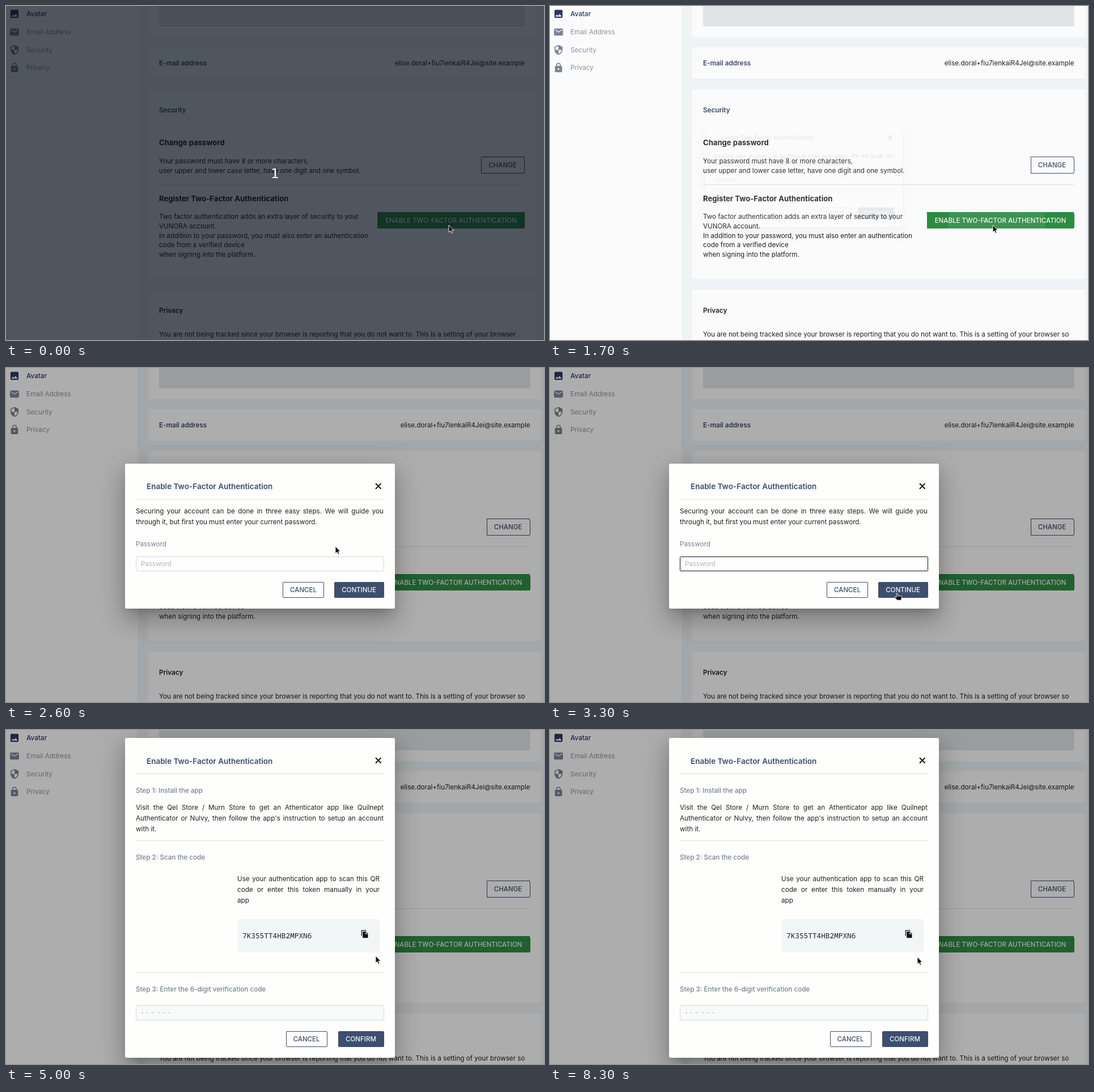
An HTML page for the animation above (8900 ms loop, 949 px wide and 590 px high).

```html
<!DOCTYPE html>
<html lang="en">
<head>
<meta charset="utf-8">
<title>Two-factor setup</title>
<style>
html, body { margin: 0; width: 100%; height: 100%; overflow: hidden; background: #f2f6f8; }
#stage { position: relative; width: 949px; height: 590px; overflow: hidden; font: 11.65px Inter, sans-serif; color: #1f2022; }
svg { position: absolute; left: 0; top: 0; display: block; overflow: visible; }
text { fill: #1f2022; white-space: pre; }
.layer { position: absolute; inset: 0; }
.card { fill: #fefefe; }
.nav { font-size: 11.7px; fill: #8b94a2; }
.on { fill: #2c3b56; font-weight: 500; }
.head { font-size: 11.7px; font-weight: 600; }
.navy { fill: #3a4a6b; }
.big { font-size: 13.1px; font-weight: 700; }
.title { font-size: 13.5px; font-weight: 600; fill: #3d4d6e; }
.step { font-weight: 500; fill: #768294; }
.hint { fill: #b0b5b7; }
.end { text-anchor: end; }
.btn rect { stroke: #3d4e6f; fill: #fefefe; rx: 2px; shape-rendering: crispEdges; }
.btn text { font-size: 11.5px; font-weight: 500; text-anchor: middle; fill: #3d4e6f; }
.btn.solid rect { fill: #3d4f71; }
.btn.green rect { fill: #2f8d43; stroke: #2f8d43; }
.btn.solid text, .btn.green text { fill: #f4f7f6; }
.rule { stroke: #dde0e2; }
.field { fill: #fefefe; stroke: #d5d9da; }
.modal { position: absolute; left: 210px; width: 476px; background: #fefefd; border-radius: 3px;
  box-shadow: 0 11px 15px -7px rgba(0,0,0,.2), 0 24px 38px 3px rgba(0,0,0,.14), 0 9px 46px 8px rgba(0,0,0,.12); }
.modal p { position: absolute; margin: 0; font-size: 11.7px; line-height: 19px; }
.modal p span { display: block; white-space: nowrap; text-align: justify; text-align-last: justify; }
.modal p span:last-child { text-align-last: left; }
#ask { top: 169px; height: 256px; }
#setup { top: 14px; height: 565px; }
#backdrop { background: #000; }
#dim { background: rgba(4,12,22,.69); }
#dim text { font: 23px "DejaVu Sans", sans-serif; fill: #fff; text-anchor: middle; }
.token { font: 12.75px "Noto Sans Mono", monospace; }
</style>
</head>
<body>
<div id="stage">
  <svg width="949" height="590">
    <rect width="949" height="590" fill="#f2f6f8"/>
    <rect width="232" height="590" class="card"/>
    <g fill="#7a8698">
      <path fill="#2c3b5c" transform="translate(5.5 4.5) scale(.79)" d="M21 19V5a2 2 0 0 0-2-2H5a2 2 0 0 0-2 2v14a2 2 0 0 0 2 2h14a2 2 0 0 0 2-2zM8.500 13.500l2.500 3L14.500 12l4.500 6H5z"/>
      <path transform="translate(5.500 36.500) scale(.79)" d="M20 4H4a2 2 0 0 0-2 2v12a2 2 0 0 0 2 2h16a2 2 0 0 0 2-2V6a2 2 0 0 0-2-2zm0 4l-8 5-8-5V6l8 5 8-5z"/>
      <path transform="translate(5.500 68) scale(.79)" d="M12 1L3 5v6c0 5.500 3.800 10.700 9 12 5.200-1.300 9-6.500 9-12V5zm0 11h7c-.5 4.100-3.300 7.800-7 8.900V12H5V6.300l7-3.100z"/>
      <path fill-rule="evenodd" transform="translate(5.500 99.500) scale(.79)" d="M18 8h-1V6A5 5 0 0 0 7 6v2H6a2 2 0 0 0-2 2v10a2 2 0 0 0 2 2h12a2 2 0 0 0 2-2V10a2 2 0 0 0-2-2zm-6 9a2 2 0 1 1 0-4 2 2 0 0 1 0 4zM15.100 8H8.900V6a3.100 3.100 0 0 1 6.200 0z"/>
    </g>
    <text class="nav on" x="36" y="18">Avatar</text>
    <text class="nav" x="36" y="50">Email Address</text>
    <text class="nav" x="36" y="81.500">Security</text>
    <text class="nav" x="36" y="113">Privacy</text>

    <g class="card">
      <rect class="wide" x="251" y="-10" width="683" height="65" rx="2"/>
      <rect class="wide" x="251" y="73" width="683" height="55" rx="2"/>
      <rect class="wide" x="251" y="147" width="683" height="335" rx="2"/>
      <rect class="wide" x="251" y="501" width="683" height="110" rx="2"/>
    </g>
    <rect class="wide" x="270" y="-10" width="645" height="46" rx="2" fill="#e3e7e8"/>
    <rect class="wide" x="270" y="315" width="645" height="1" fill="#dfe1e3"/>

    <text class="head navy" x="270" y="104.500">E-mail address</text>
    <text class="head navy" x="270" y="188">Security</text>
    <text class="big" x="270" y="246">Change password</text>
    <text x="270" y="278">Your password must have 8 or more characters,</text>
    <text x="270" y="295">user upper and lower case letter, have one digit and one symbol.</text>
    <text class="big" x="270" y="344.500">Register Two-Factor Authentication</text>
    <text x="270" y="376">Two factor authentication adds an extra layer of security to your</text>
    <text x="270" y="393">VUNORA account.</text>
    <text x="270" y="409.500">In addition to your password, you must also enter an authentication</text>
    <text x="270" y="426">code from a verified device</text>
    <text x="270" y="443">when signing into the platform.</text>
    <text class="head" x="270" y="542">Privacy</text>
    <text x="270" y="584">You are not being tracked since your browser is reporting that you do not want to. This is a setting of your browser<tspan id="more"> so</tspan></text>

    <g id="right">
      <text class="end" x="915" y="104.500">elise.doral+fiu7lenkaiR4Jei@site.example</text>
      <g class="btn"><rect x="838.500" y="266.500" width="76" height="29"/><text x="876" y="285.200">CHANGE</text></g>
      <g class="btn green">
        <rect x="655.500" y="364.500" width="259" height="28"/>
        <circle id="wave" cx="778" cy="387" fill="#fff" clip-path="url(#enableClip)"/>
        <text x="785" y="382.700">ENABLE TWO-FACTOR AUTHENTICATION</text>
      </g>
      <rect id="focus" x="655.500" y="364" width="259.500" height="29" fill="none" stroke="#a9b3ab" stroke-dasharray="1 1"/>
    </g>
    <clipPath id="enableClip"><rect x="655" y="364" width="260" height="29" rx="2"/></clipPath>
  </svg>

  <div id="backdrop" class="layer"></div>

  <div id="ask" class="modal">
    <svg width="476" height="256" viewBox="210 169 476 256">
      <text class="title" x="248" y="214">Enable Two-Factor Authentication</text>
      <path d="M652 204l9.500 9.500m0-9.500l-9.500 9.500" stroke="#111" stroke-width="1.900"/>
      <path class="rule" d="M229 232.500H667"/>
      <text class="step" x="229" y="314.500" style="font-weight:400">Password</text>
      <rect id="pass" class="field" x="229.500" y="333.500" width="437" height="25" rx="1"/>
      <text id="hint" class="hint" x="238" y="349.500">Password</text>
      <g id="dots" fill="#0c0c0c"></g>
      <path id="caret" d="M393.500 338V354" stroke="#111"/>
      <g class="btn"><rect x="488.500" y="378.500" width="72" height="27"/><text x="524.500" y="396.200">CANCEL</text></g>
      <g class="btn solid">
        <rect x="579.500" y="378.500" width="87" height="27"/>
        <circle id="wave2" cx="652" cy="399" fill="#fff" clip-path="url(#nextClip)"/>
        <text x="622.500" y="396.200">CONTINUE</text>
      </g>
      <clipPath id="nextClip"><rect x="579" y="378" width="88" height="28" rx="2"/></clipPath>
    </svg>
    <p style="left:19px;top:75px;width:437px"><span>Securing your account can be done in three easy steps. We will guide you</span><span>through it, but first you must enter your current password.</span></p>
  </div>

  <div id="setup" class="modal">
    <svg width="476" height="565" viewBox="210 14 476 565">
      <text class="title" x="248" y="59.700">Enable Two-Factor Authentication</text>
      <path d="M652 49l9.500 9.500m0-9.500l-9.500 9.500" stroke="#111" stroke-width="1.900"/>
      <path class="rule" d="M229 77.500H667M229 195.500H667M229 428.500H667"/>
      <text class="step" x="229" y="111">Step 1: Install the app</text>
      <text class="step" x="229" y="229">Step 2: Scan the code</text>
      <rect x="408" y="334" width="251" height="59" rx="2" fill="#f2f6f7"/>
      <text class="token" x="417" y="367.500">7K355TT4HB2MPXN6</text>
      <path transform="translate(625.500 353) scale(.62)" d="M16 1H4a2 2 0 0 0-2 2v14h2V3h12zm-1 4H8a2 2 0 0 0-2 2v14a2 2 0 0 0 2 2h11a2 2 0 0 0 2-2V11zm-1 7V6.500l5.500 5.500z" fill="#111"/>
      <text class="step" x="229" y="461.700">Step 3: Enter the 6-digit verification code</text>
      <rect class="field" x="229.500" y="486.500" width="437" height="26" rx="1" style="fill:#f8faf9"/>
      <text class="hint" x="238" y="503">- - -  - - -</text>
      <g class="btn"><rect x="494.500" y="532.500" width="72" height="27"/><text x="530" y="549.700">CANCEL</text></g>
      <g class="btn solid"><rect x="586.500" y="532.500" width="80" height="27"/><text x="626" y="549.700">CONFIRM</text></g>
    </svg>
    <p style="left:19px;top:113.500px;width:437px"><span>Visit the Qel Store / Murn Store to get an Athenticator app like Quilnept</span><span>Authenticator or Nulvy, then follow the app's instruction to setup an account</span><span>with it.</span></p>
    <p style="left:198px;top:239.500px;width:251px"><span>Use your authentication app to scan this QR</span><span>code or enter this token manually in your</span><span>app</span></p>
  </div>

  <div id="dim" class="layer"><svg width="949" height="590"><text x="474.500" y="303.500">1</text></svg></div>

  <svg width="949" height="590">
    <g id="cursor" stroke-linejoin="round">
      <path id="arrow" d="M0 0V12.500L2.800 10.100 4.800 14.400 6.900 13.500 5 9.300H8.900z" fill="#0a0a0a" stroke="#fff" stroke-width=".9"/>
      <path id="hand" d="M0 .8C0-.5 2-.5 2 .8V4.500H8.500Q9.500 4.800 9.300 6.500L8.300 12H1.300L-3 7.500Q-3.300 5.500-1.200 6L0 7z" fill="#0a0a0a" stroke="#fff" stroke-width=".9"/>
      <path id="beam" d="M-3-7.500Q0-7.500 0-6V6Q0 7.500-3 7.500M3-7.500Q0-7.500 0-6M0 6Q0 7.500 3 7.500" fill="none" stroke="#111"/>
    </g>
  </svg>
</div>

<script>
const LOOP = 8900, TICK = 100;
const OPEN = 1695, FOCUS = 2800, LEAVE = 3200, PASTE = 3800, SUBMIT = 4700, NEXT = 4950;
const SCROLLBAR = 9.5;

// time, x, y of the pointer
const path = [
  [0, 781, 387], [2100, 781, 387], [2300, 751, 382], [2400, 584, 316], [2600, 581, 315],
  [2800, 584, 351], [3100, 584, 351], [3600, 652, 469], [3900, 652, 469], [4200, 652, 399],
  [8299, 652, 399], [8300, 648, 401], [LOOP, 648, 401]
];

const $ = id => document.getElementById(id);
const show = (id, on) => { $(id).style.visibility = on ? 'visible' : 'hidden'; };
const clamp = v => Math.min(1, Math.max(0, v));
const easeOut = (u, power) => 1 - Math.pow(1 - clamp(u), power);
const wide = [...document.querySelectorAll('.wide')].map(el => [el, +el.getAttribute('width')]);

for (let i = 0; i < 16; i++) {
  const dot = document.createElementNS('http://www.w3.org/2000/svg', 'circle');
  dot.setAttribute('cx', 243 + i * 9.7);
  dot.setAttribute('cy', 346.3);
  dot.setAttribute('r', 4.4);
  $('dots').append(dot);
}

function pointer(t) {
  const i = path.findIndex(p => p[0] > t);
  const [t0, x0, y0] = path[i - 1], [t1, x1, y1] = path[i];
  const u = (t - t0) / (t1 - t0);
  return [x0 + (x1 - x0) * u, y0 + (y1 - y0) * u];
}

const overContinue = (x, y) => x > 579 && x < 667 && y > 378 && y < 406;

function ripple(id, age, reach) {
  $(id).setAttribute('r', age > 0 ? reach * easeOut(age / 450, 2) : 0);
  $(id).setAttribute('opacity', 0.08 * (1 - clamp((age - 300) / 350)));
}

function render(t) {
  const opened = t >= OPEN, asking = opened && t < NEXT;
  const shift = opened ? SCROLLBAR : 0;
  for (const [el, w] of wide) el.setAttribute('width', w + shift);
  $('right').setAttribute('transform', `translate(${shift} 0)`);
  $('more').style.display = opened ? 'inline' : 'none';
  show('focus', !opened);
  show('dim', t < 100);
  ripple('wave', t - 1530, 140);
  ripple('wave2', t - SUBMIT + 70, 90);

  $('backdrop').style.opacity = 0.32 * easeOut((t - OPEN) / 400, 3);
  const grow = easeOut((t - OPEN) / 150, 3);
  $('ask').style.display = asking ? 'block' : 'none';
  $('ask').style.opacity = grow;
  $('ask').style.transform = `scale(${0.7 + 0.3 * grow})`;
  $('setup').style.display = t >= NEXT ? 'block' : 'none';

  $('pass').style.stroke = t >= FOCUS && t < SUBMIT ? '#111' : '';
  $('hint').style.display = t < PASTE ? 'inline' : 'none';
  $('dots').style.display = t >= PASTE ? 'inline' : 'none';
  $('caret').style.display = t >= PASTE && t < 4200 ? 'inline' : 'none';

  const [x, y] = pointer(t);
  const beam = t >= FOCUS && t < LEAVE;
  const hand = (t >= 100 && !opened) || (asking && overContinue(x, y));
  show('beam', beam);
  show('hand', hand);
  show('arrow', !beam && !hand);
  $('cursor').setAttribute('transform', `translate(${x} ${y})`);
}

const start = performance.now();
function loop() {
  const t = (performance.now() - start) % LOOP;
  render(Math.floor(t / TICK) * TICK);
  requestAnimationFrame(loop);
}
loop();
</script>
</body>
</html>
```
